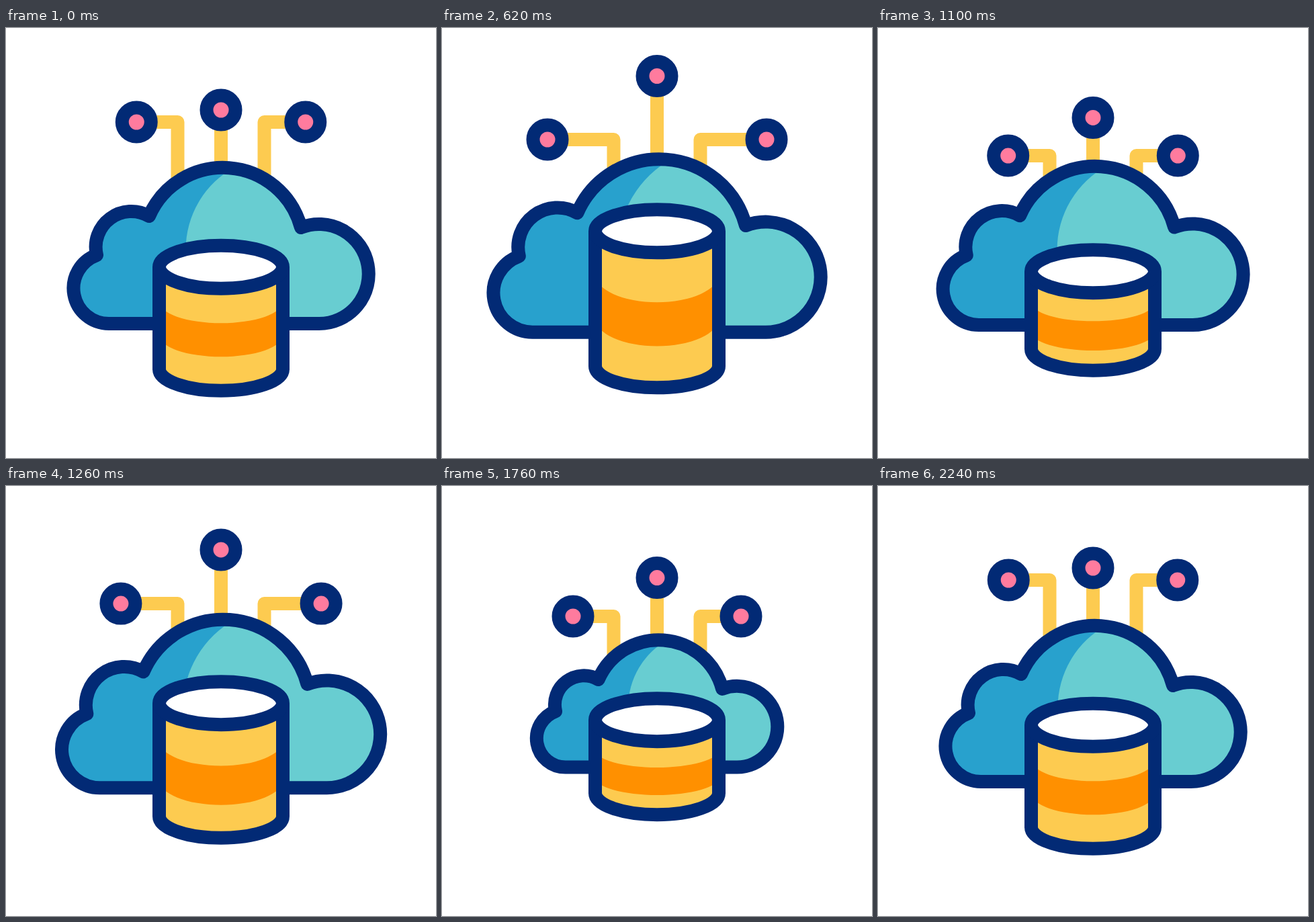
An HTML page for the animation above (2.4 s loop, 640x640 px).

```html
<!DOCTYPE html>
<html lang="en">
<head>
<meta charset="utf-8">
<title>Cloud database</title>
<style>
  html, body { margin: 0; width: 100%; height: 100%; overflow: hidden; background: #fff; }
  svg { display: block; width: 100vw; height: 100vh; }
  .line { stroke: #022a75; stroke-width: 20; stroke-linejoin: round; fill: none; }
  .wire { stroke: #fdcb50; stroke-width: 20; stroke-linejoin: round; fill: none; }
  .node { stroke: #022a75; stroke-width: 20; fill: #ff7b9e; }
</style>
</head>
<body>
<svg viewBox="0 0 640 640">
  <defs>
    <path id="shape" d="M153.5 440A52.6 52.6 0 0 1 135 338A53 53 0 0 1 213 280A120 120 0 0 1 439 297A74 74 0 1 1 466 440Z"/>
    <clipPath id="inside"><use href="#shape"/></clipPath>
  </defs>
  <path class="wire" id="wireL"/>
  <path class="wire" id="wireM"/>
  <path class="wire" id="wireR"/>
  <circle class="node" id="nodeL" r="21.5"/>
  <circle class="node" id="nodeM" r="21.5" cx="320"/>
  <circle class="node" id="nodeR" r="21.5"/>
  <g id="cloud">
    <use href="#shape" fill="#28a1cd"/>
    <path clip-path="url(#inside)" fill="#68cdd1" d="M340.6 207A140 140 0 0 0 267.5 330V440H560V200H340.6Z"/>
    <use href="#shape" class="line" id="rim"/>
  </g>
  <path id="body" fill="#fdcb50"/>
  <path id="stripe" fill="#ff9000"/>
  <path class="line" id="wall"/>
  <ellipse class="line" id="lid" cx="320" rx="92" ry="32" style="fill:#fff"/>
</svg>
<script>
const LOOP = 2400;
const $ = id => document.getElementById(id);
const set = (id, attrs) => {
  for (const k in attrs) $(id).setAttribute(k, attrs[k]);
};

// Smooth steps between key values
const track = (times, values) => t => {
  if (t <= times[0]) return values[0];
  for (let i = 1; i < times.length; i++) {
    if (t < times[i]) {
      const p = (t - times[i - 1]) / (times[i] - times[i - 1]);
      return values[i - 1] + (values[i] - values[i - 1]) * p * p * (3 - 2 * p);
    }
  }
  return values[values.length - 1];
};

const early = [200, 600, 1000, 1400, 1800, 2200];
const mid = dip => [220, 620, 1020, 1415, dip, 2240];
const late = [240, 640, 1040, 1440, 1840, 2240];

const cloudScale = track(early, [1, 1.11, 1, 1.11, 0.808, 1]);
const band = track(early, [50, 65.5, 39.5, 65.5, 40.3, 50]);
const bandRise = track(mid(1730), [85.5, 104.5, 56.3, 104.5, 59.5, 85.5]);
const height = track(mid(1750), [152, 201, 105, 201, 109, 152]);
const nodeTop = track(mid(1750), [122, 71.5, 141, 71.5, 136.6, 122]);
const spread = track(mid(1750), [125.75, 163, 121.8, 163, 125, 125.75]);
const nodeSide = track(mid(1760), [140, 166, 193, 166, 194, 140]);
const foot = track(late, [549.8, 545.3, 518, 545.3, 494, 549.8]);

function draw(t) {
  const s = cloudScale(t);
  set('cloud', { transform: `translate(320 323.7) scale(${s}) translate(-320 -323.7)` });
  $('rim').style.strokeWidth = 20 / s;

  const d = spread(t), y = nodeSide(t), top = nodeTop(t);
  set('nodeL', { cx: 320 - d, cy: y });
  set('nodeR', { cx: 320 + d, cy: y });
  set('nodeM', { cy: top });
  set('wireL', { d: `M${320 - d} ${y}H255.5V300` });
  set('wireR', { d: `M${320 + d} ${y}H384.5V300` });
  set('wireM', { d: `M320 ${top}V300` });

  const base = foot(t), low = base - 42, high = low - height(t);
  const can = `M228 ${high}V${low}A92 32 0 0 0 412 ${low}V${high}`;
  set('body', { d: can });
  set('wall', { d: can });
  set('lid', { cy: high });

  const w = band(t), ry = 32 * w / 50;
  const a = base - bandRise(t) - w / 2 - ry, b = a + w;
  set('stripe', { d: `M228 ${a}A92 ${ry} 0 0 0 412 ${a}V${b}A92 ${ry} 0 0 1 228 ${b}Z` });
}

const start = performance.now();
function tick() {
  draw((performance.now() - start) % LOOP);
  requestAnimationFrame(tick);
}
tick();
</script>
</body>
</html>
```
